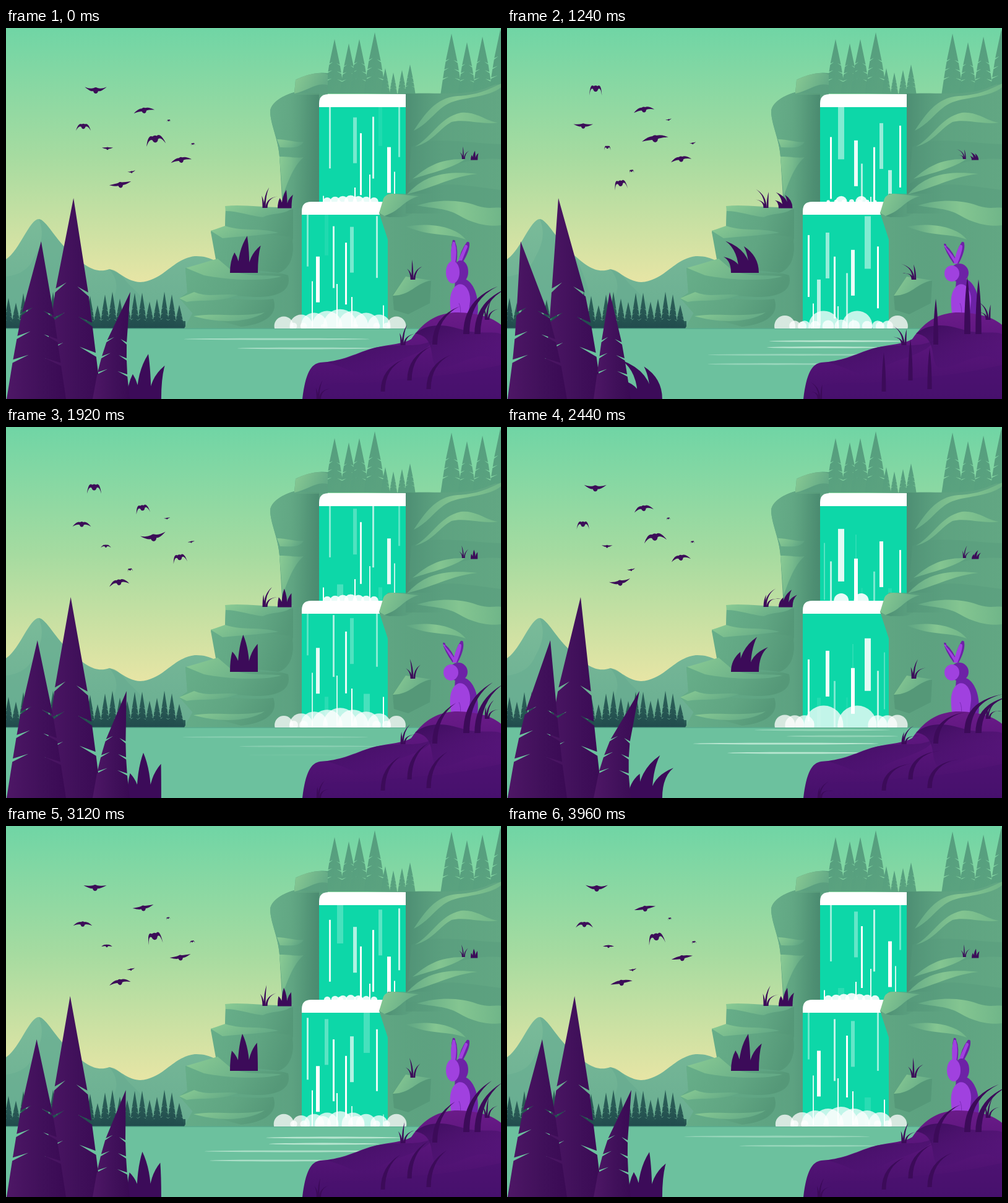
An HTML page that plays this animation: 800x600 px, repeating every 4 s.

```html
<!DOCTYPE html>
<html lang="en">
<head>
<meta charset="utf-8">
<title>Waterfall</title>
<style>
html, body { margin: 0; width: 100%; height: 100%; overflow: hidden; background: #6cc19e; }
svg { display: block; width: 100%; height: 100%; }
</style>
</head>
<body>
<svg viewBox="0 0 800 600" xmlns="http://www.w3.org/2000/svg">
<defs>
  <linearGradient id="sky" x2="0" y2="1"><stop stop-color="#70d5a5"/><stop offset=".5" stop-color="#a6dba0"/><stop offset="1" stop-color="#e8e5a5"/></linearGradient>
  <linearGradient id="hill" x2="0" y2="1"><stop stop-color="#7abb99"/><stop offset="1" stop-color="#69ad91"/></linearGradient>
  <linearGradient id="pine" x2=".5" y2="1"><stop stop-color="#549d7e"/><stop offset="1" stop-color="#5aa27f"/></linearGradient>
  <linearGradient id="forest" x2="0" y2="1"><stop stop-color="#2d6259"/><stop offset="1" stop-color="#214b4d"/></linearGradient>
  <linearGradient id="cliff" x2="1"><stop stop-color="#65ac88"/><stop offset=".55" stop-color="#589c7d"/><stop offset="1" stop-color="#62a783"/></linearGradient>
  <linearGradient id="ledge" x2="1" y2=".2"><stop stop-color="#67ae89"/><stop offset=".6" stop-color="#60a582"/><stop offset="1" stop-color="#559878"/></linearGradient>
  <linearGradient id="lit" x2="1" y2=".3"><stop stop-color="#8acb94"/><stop offset="1" stop-color="#64aa86"/></linearGradient>
  <linearGradient id="glow"><stop stop-color="#65ab86"/><stop offset=".5" stop-color="#84c591"/><stop offset="1" stop-color="#70b689"/></linearGradient>
  <linearGradient id="shade"><stop stop-color="#417f69" stop-opacity=".55"/><stop offset="1" stop-color="#4b8d72" stop-opacity="0"/></linearGradient>
  <linearGradient id="rock"><stop offset=".2" stop-color="#5fa582"/><stop offset="1" stop-color="#5fa582" stop-opacity="0"/></linearGradient>
  <linearGradient id="plum"><stop stop-color="#4e1766"/><stop offset=".6" stop-color="#40105a"/><stop offset="1" stop-color="#3a0a54"/></linearGradient>
  <linearGradient id="mound" x2="0" y2="1"><stop stop-color="#6b1b89"/><stop offset=".5" stop-color="#551477"/><stop offset="1" stop-color="#45106a"/></linearGradient>
  <linearGradient id="moundDark" x2=".8" y2="1"><stop stop-color="#3c0d5c"/><stop offset="1" stop-color="#521478" stop-opacity=".3"/></linearGradient>
  <clipPath id="upperClip"><path d="M506 128H646V281H506Z"/></clipPath>
  <clipPath id="lowerClip"><path d="M478 302H617V486H478Z"/></clipPath>
  <clipPath id="upperFoamClip"><path d="M480 240H640V282H480Z"/></clipPath>
  <clipPath id="lowerFoamClip"><path d="M420 420H670V486H420Z"/></clipPath>
</defs>

<path fill="url(#sky)" d="M0 0H800V415H0Z"/>
<path fill="url(#hill)" d="M0 374C22 360 38 309 53 309C64 309 82 345 103 362C130 388 146 397 167 390C185 395 195 410 217 411C255 408 270 373 305 369C330 368 345 380 360 390V486H0Z"/>
<path fill="#68ad91" opacity=".6" d="M53 309C62 330 58 350 45 372C35 395 15 400 0 402V486H150C135 440 125 385 103 362C82 345 64 309 53 309Z"/>
<path fill="#66aa8f" opacity=".6" d="M167 390C180 405 185 425 165 452L190 486H260C235 450 215 430 198 414C185 398 180 392 167 390Z"/>
<g id="forestTrees" fill="url(#forest)"><path d="M0 474H290V486H0Z"/></g>
<g id="pines" fill="url(#pine)"></g>

<path fill="url(#cliff)" d="M520 73C500 70 474 80 468 84L466 104C448 109 428 120 427 135C427 155 440 180 442 208L447 291H355L354 322L331 328L341 374V388H290L293 428L280 437L302 460L288 486H800V92C785 88 780 101 745 104C710 108 690 104 646 106L520 108Z"/>
<g fill="url(#ledge)">
  <path d="M466 104C450 108 428 120 427 135C428 158 440 177 442 208L446 260L452 291H506V106Z"/>
  <path d="M355 292C390 288 430 300 464 293V340Q462 355 440 360L354 330Z"/>
  <path d="M331 330L354 323C390 332 430 334 462 338C468 365 460 390 440 396L341 385Z"/>
  <path d="M290 390L345 388C390 402 440 392 456 400C462 425 440 436 400 435L293 428Z"/>
  <path d="M281 438C330 430 385 444 432 438C440 460 425 478 380 483L302 462Z"/>
</g>
<g fill="url(#lit)">
  <path d="M468 84C490 72 510 71 520 75V92C500 88 490 101 466 106Z"/>
  <path d="M438 180C455 180 470 186 481 184C475 196 455 193 443 193Z"/>
  <path d="M442 208C460 208 470 211 481 209C465 222 455 250 447 272Z"/>
  <path d="M354 288C390 284 435 294 465 288C455 303 430 298 415 306C395 304 375 296 355 296Z"/>
  <path d="M331 328L354 320C385 330 405 322 440 331C410 336 375 337 350 340Z"/>
  <path d="M291 388L342 373L362 390C385 404 420 398 445 402C405 412 345 405 320 400Z"/>
  <path d="M280 437L304 427C330 437 345 428 375 432C345 444 315 439 292 443Z"/>
  <path d="M303 466C340 460 375 469 418 460C390 478 340 477 303 466Z"/>
</g>
<path fill="url(#shade)" transform="matrix(-1 0 0 1 506 0)" d="M0 108H45V486H0Z"/>
<path fill="url(#shade)" d="M646 106H706V300H646Z"/>
<path fill="#559a7a" opacity=".4" d="M655 192C690 175 730 185 800 188V212C745 208 700 228 650 252ZM650 270C700 243 740 255 800 262V290C750 295 700 278 650 285Z"/>
<g fill="url(#glow)">
  <path d="M659 166C675 142 694 112 730 110C765 108 780 99 800 90V96C780 112 742 112 720 120C695 130 686 153 659 166Z"/>
  <path d="M661 192C690 175 700 145 735 137C760 134 775 151 795 153C770 157 740 146 720 152C700 163 690 184 661 192Z"/>
  <path d="M657 244C680 225 700 211 742 212C725 225 690 234 657 244Z"/>
  <path d="M648 269C672 243 700 229 762 236C725 239 690 258 648 269Z"/>
  <path d="M664 287C700 276 735 278 760 287C780 294 790 289 800 291V319C775 322 750 314 732 303C712 291 690 292 664 287Z"/>
  <path d="M647 321C680 315 725 319 743 342C715 331 685 338 647 321Z"/>
</g>

<path fill="#0dd7a8" d="M506 120H646V281H506Z"/><path fill="#fff" d="M506 128V122Q506 107 521 107H646V128Z"/>
<g clip-path="url(#upperClip)"><g id="upperStreaks" fill="#fff"></g></g>
<g id="upperFoam" clip-path="url(#upperFoamClip)" fill="#fff"></g>
<path fill="#0dd7a8" d="M478 295H618V486H478Z"/><path fill="#fff" d="M478 302V296Q478 281 493 281H618V302Z"/>
<g clip-path="url(#lowerClip)"><g id="lowerStreaks" fill="#fff" transform="matrix(-1 0 0 1 1123 177)"></g></g>

<path fill="url(#rock)" d="M603 299L617 268H690V486H617V342Z"/>
<path fill="url(#lit)" d="M603 299L610 276Q614 268 625 268L667 272C640 280 640 294 612 304Z"/>
<path fill="url(#shade)" d="M612 304C640 294 640 280 667 272V290C650 310 640 305 620 306Z"/>
<path fill="#559878" d="M625 432L646 403L687 409L685 445L650 463L627 456Z"/>
<path fill="url(#lit)" d="M625 433L646 402L687 408C660 414 655 432 625 433Z"/>

<path fill="#6cc19e" d="M0 486H800V600H0Z"/><path fill="#5aad90" d="M0 485.500H800V487H0Z"/>
<g id="lowerFoam" clip-path="url(#lowerFoamClip)" fill="#fff"></g>
<g id="ripples" fill="#d3f3e2"></g>
<g id="birds" fill="#3c0d58"></g>

<g id="rabbit">
  <path fill="#6d22a6" d="M726 407C748 396 767 425 762 466H722Z"/>
  <path fill="#a041df" d="M724 420C735 406 751 419 750 442L747 466H720C716 442 717 430 724 420Z"/>
  <path fill="none" stroke="#7c2cb8" d="M732 445Q736 453 734 466"/>
</g>
<path fill="url(#mound)" d="M479 600C484 558 493 543 508 541C540 539 560 529 580 522C610 511 640 513 655 503C678 470 700 462 725 460C762 460 785 468 800 480V600Z"/>
<path fill="url(#moundDark)" d="M508 541C550 541 575 521 602 516C640 510 665 518 690 505C680 530 620 535 600 555C575 575 545 540 508 541Z"/>
<path fill="url(#moundDark)" d="M661 494C690 472 720 483 745 490C770 495 790 490 800 495V540C760 515 735 550 700 550C680 545 700 500 661 494Z"/>
<path fill="#4a1270" opacity=".55" d="M486 600C510 560 560 580 610 572C660 562 690 570 800 545V600Z"/>
<g id="plants" fill="#3c0b59"></g>
<g id="trees" fill="url(#plum)"></g>
</svg>
<script>
const LOOP = 4000, STEP = 40, TAU = Math.PI * 2;
const $ = id => document.getElementById(id);
const mod = (v, m) => ((v % m) + m) % m;
const mix = (a, b, p) => a + (b - a) * p;
const clamp = v => Math.max(0, Math.min(1, v));
const smooth = p => (p = clamp(p), p * p * (3 - 2 * p));

function set(node, attrs) {
  for (const name in attrs) node.setAttribute(name, attrs[name]);
  return node;
}
function add(parent, tag, attrs = {}) {
  return parent.appendChild(set(document.createElementNS('http://www.w3.org/2000/svg', tag), attrs));
}

// Smooth periodic curve through [time, value] points.
function curve(points) {
  const n = points.length;
  const at = i => [points[mod(i, n)][0] + LOOP * Math.floor(i / n), points[mod(i, n)][1]];
  const slope = i => (at(i + 1)[1] - at(i - 1)[1]) / (at(i + 1)[0] - at(i - 1)[0]);
  return t => {
    t = mod(t, LOOP);
    let i = n - 1;
    while (points[i][0] > t) i--;
    const [t0, a] = at(i), [t1, b] = at(i + 1), d = t1 - t0, p = (t - t0) / d, q = 1 - p;
    return a * (1 + 2 * p) * q * q + slope(i) * d * p * q * q + b * (3 - 2 * p) * p * p - slope(i + 1) * d * q * p * p;
  };
}
const wind = curve([[0, .45], [640, -.1], [1240, -1], [1920, .2], [2440, 1], [3120, .15]]);

// Notched conifer; shift moves the tip sideways along a bend.
function fir(x, base, height, half, shift = 0) {
  const point = (side, u, inset = 1) =>
    `${(x + shift * (1 - u) ** 2 + side * half * inset * u ** .8).toFixed(1)},${(base - height * (1 - u)).toFixed(1)}`;
  const edge = (side, first) => [0, 1, 2].flatMap(i => {
    const u = first + i * .15;
    return [point(side, u), point(side, u - .03, .35), point(side, u + .02)];
  });
  return 'M' + [point(1, 0), ...edge(1, .47), point(1, 1), point(-1, 1), ...edge(-1, .45).reverse()].join('L') + 'Z';
}

for (let i = 0; i < 24; i++) add($('forestTrees'), 'path', { d: fir(4 + 12 * i, 486, 36 + 24 * Math.abs(Math.sin(i * 2.3 + .6)), 8) });

[[531, 18], [554, 25], [571, 18], [596, 7], [613, 65], [626, 72], [640, 68], [653, 59], [720, 9], [745, 23], [770, 14], [799, 2]]
  .forEach(([x, top]) => add($('pines'), 'path', { d: fir(x, 106, 106 - top, (106 - top) * .18) }));

// Each streak passes the middle height of its kind at its peak time.
const streakKinds = [
  { width: 2, height: 92, middle: 240, speed: 150, places: [[512, 790], [563, 880], [587, 20], [627, 50]] },
  { width: 3, height: 100, middle: 162, speed: 205, places: [[522, 170], [572, 960], [592, 90], [634, 260]] },
  { width: 6, height: 74, middle: 188, speed: 155, places: [[561, 280], [602, 460], [616, 970]] },
  { width: 10, height: 85, middle: 176, speed: 187, places: [[535, 500]] }
];
const streaks = streakKinds.flatMap(({ width, height, middle, speed, places }) => places.map(([x, peak]) => ({
  middle, speed, peak,
  nodes: ['upperStreaks', 'lowerStreaks'].map(id => add($(id), 'rect', { x, width, height }))
})));

// Foam: two big bubbles, a low cluster, and mirrored puffs on both sides.
const puffs = [];
function puff(x, r, phase, depth, both = true) {
  const nodes = [add($('lowerFoam'), 'circle', { cx: x, cy: 482, opacity: .75 })];
  if (both) nodes.push(add($('upperFoam'), 'circle', { cx: 557 + (x - 540) * .6, cy: 281, opacity: .9 }));
  puffs.push({ r, phase, depth, nodes });
}
for (const side of [-1, 1]) {
  puff(539 + side * 27, 32, .4, .5);
  for (let i = 0; i < 3; i++) puff(540 + side * (91 - 16 * i), 17, i ? .55 : .3, i ? .35 : .07, false);
}
for (let i = -3; i <= 3; i++) puff(540 + i * 21, 28 - 3 * Math.abs(i), .95, .5);

const ripples = [[283, 500, 300], [380, 515, 222], [397, 488, 219], [456, 498, 180]].map(([x, y, width], i) => ({
  x: x + width / 2, y, speed: i % 2 ? -.04 : .03, start: i < 2 ? -150 : 340,
  node: add($('ripples'), 'ellipse', { rx: width / 2, ry: 1.4 })
}));

// x, y, size, flap phase
const birds = [
  [145, 101, 1, 0], [125, 160, .85, .66], [223, 134, .92, .78], [241, 181, 1.15, .35], [283, 214, .92, .78],
  [185, 254, .95, .13], [263, 150, .28, .5], [164, 195, .48, .13], [302, 188, .3, .55], [203, 233, .36, 0]
].map(([x, y, size, phase]) => ({ x, y, size, phase, tilt: x > 170 ? -10 : 0, node: add($('birds'), 'path') }));

function birdPath(angle) {
  const s = Math.sin(angle), x = 19 * Math.cos(angle), y = -14 * s - 1, top = -4 + 6 * s, under = 1 + 5 * s;
  return `M${-x},${y}Q-9,${top} -3,-4Q0,-6 3,-4Q9,${top} ${x},${y}Q8,${under} 4,1Q3,5 0,5Q-3,5 -4,1Q-8,${under} ${-x},${y}Z`;
}

// A blade rises straight from its foot, then curls towards its angle.
function blade([x, width, length, angle], lean) {
  const a = angle + lean, tip = `${x + length * Math.sin(a)},${-length * Math.cos(a)}`;
  const l = x - width / 2, r = x + width / 2, bow = -length * .6;
  return `M${l},0Q${l},${bow} ${tip}Q${r},${bow} ${r},0Z`;
}
// foot x, width, length, angle
const BUSH = [[8, 16, 33, 0], [22, 19, 60, .12], [37, 16, 46, .3]];
const GRASS = [[0, 3, 34, 0], [3, 3, 26, .55], [-2, 3, 20, -.35]];
const REED = [[0, 8, 74, .55]];
const bushLean = t => wind(t) * .44 - .22;
const grassLean = t => wind(t + 200) * .6;
const reedLean = t => wind(t) * .4 - .15;

const plants = [];
function plant(blades, lean, spots) {
  for (const [x, y, scale] of spots) {
    plants.push({ blades, lean, node: add($('plants'), 'path', { transform: `translate(${x} ${y}) scale(${scale})` }) });
  }
}
plant(BUSH, bushLean, [[362, 396, 1], [439, 291.5, .5], [751, 213.5, .25], [196, 600, 1.22]]);
plant(GRASS, grassLean, [[418, 291, 1], [641, 513, 1], [777, 472, .95], [505, 600, .9]]);
plant(GRASS, bushLean, [[657, 407, .95], [739, 212, .6]]);
plant(REED, reedLean, [[693, 512, 1], [744, 495, 1.25], [762, 495, 1.2], [609, 588, .85], [652, 570, .9], [683, 584, .9]]);

// foot x, height, half width, resting shift, sway
const trees = [[105, 325, 49, -4, 18], [49, 255, 48, -3, 24], [170, 173, 30, 20, 24]]
  .map(shape => ({ shape, node: add($('trees'), 'path') }));

const DARK = '#6d22a6', LIGHT = '#a041df';
const [earL, earLFront, earR, earRFront] = [DARK, LIGHT, DARK, LIGHT].map(fill => add($('rabbit'), 'path', { fill }));
const headBack = add($('rabbit'), 'ellipse', { fill: DARK }), headFront = add($('rabbit'), 'ellipse', { fill: LIGHT });

function leaf(x, y, tx, ty, w) {
  const mx = mix(x, tx, .6), my = mix(y, ty, .6);
  return `M${x - 3},${y}Q${mx - w},${my} ${tx - 2},${ty}Q${tx + 2},${ty - 1} ${tx + 2},${ty + 3}Q${mx + w},${my} ${x + 3},${y}Z`;
}

function drawRabbit(t) {
  const p = smooth((t - 250) / 300) - smooth((t - 2650) / 300);
  const lx = mix(724, 708, p), ly = mix(343, 349, p), rx = mix(747, 737, p), foot = mix(734, 727, p);
  earL.setAttribute('d', leaf(725, 381, lx, ly, 7));
  earLFront.setAttribute('d', leaf(mix(723, 727, p), 381, lx, ly + 3, mix(6, 2, p)));
  earR.setAttribute('d', leaf(foot, 381, rx, 346, 8));
  earRFront.setAttribute('d', leaf(foot - 2, 381, rx - 3, 351, mix(3, 5, p)));
  set(headBack, { cx: mix(735, 731, p), cy: mix(394, 396, p), rx: mix(12, 15, p), ry: mix(18, 15, p) });
  set(headFront, { cx: mix(722, 719, p), cy: mix(395, 397, p), rx: mix(11, 12, p), ry: mix(18, 13, p) });
}

function draw(t) {
  for (const { middle, speed, peak, nodes } of streaks) {
    const p = mod(t - peak + 500, 1000) / 1000;
    for (const node of nodes) set(node, { y: middle + speed * (p - .5), opacity: Math.min(1, p * 2, (1 - p) * 3) });
  }
  for (const { r, phase, depth, nodes } of puffs) {
    const size = r * (1 - depth + depth * Math.cos(TAU * (t / 1000 - phase)));
    nodes.forEach((node, i) => node.setAttribute('r', i ? size * .38 : size));
  }
  for (const { x, y, speed, start, node } of ripples) {
    const age = mod(t - start, 2000);
    set(node, { cx: x + speed * age, cy: y + .0205 * age, opacity: .75 * clamp(Math.min(age / 200, (1600 - age) / 400)) });
  }
  const drift = Math.cos(TAU * t / LOOP) - 1;
  for (const { x, y, size, phase, tilt, node } of birds) {
    const lift = Math.cos(TAU * (t / 800 - phase));
    set(node, {
      d: birdPath((40 * lift - 20) * Math.PI / 180),
      transform: `translate(${x + 1.3 * drift} ${y + drift + (lift - 1) * .8 * size}) rotate(${tilt}) scale(${size})`
    });
  }
  for (const { blades, lean, node } of plants) node.setAttribute('d', blades.map(b => blade(b, lean(t))).join(''));
  for (const { shape: [x, height, half, rest, sway], node } of trees) {
    node.setAttribute('d', fir(x, 600, height, half, rest + sway * wind(t)));
  }
  drawRabbit(t);
}

const begin = performance.now();
function frame() {
  const t = mod(performance.now() - begin, LOOP);
  draw(Math.floor(t / STEP) * STEP);
  requestAnimationFrame(frame);
}
frame();
</script>
</body>
</html>
```
